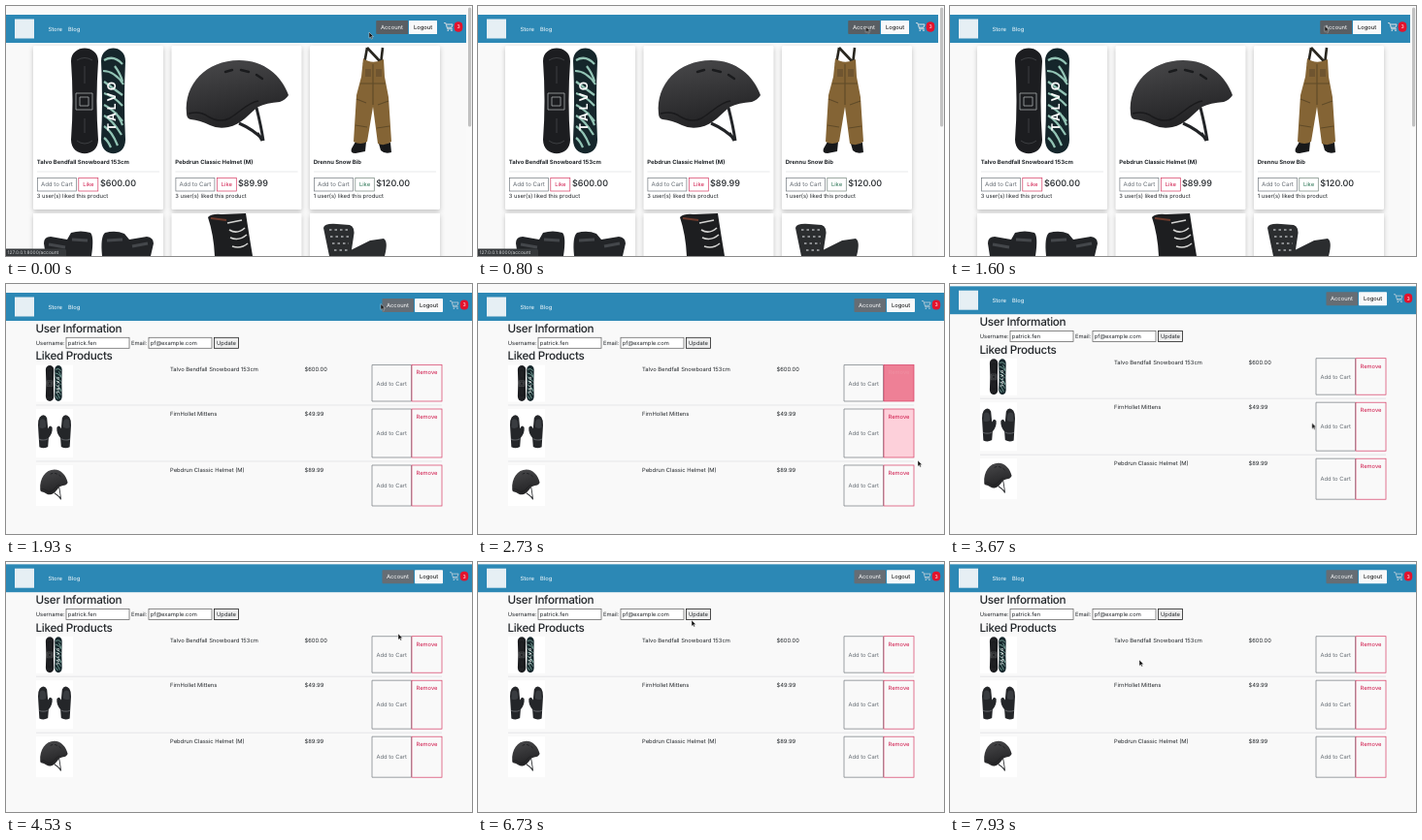
An HTML page that plays this animation: 480 by 258 pixels, repeating every 8000 ms.

```html
<!DOCTYPE html>
<html lang="en">
<head>
<meta charset="utf-8">
<title>Snow store</title>
<style>
  html, body { margin: 0; width: 100%; height: 100%; overflow: hidden; background: #f9f9f9; }
  svg { display: block; width: 100%; height: 100%; }
  text { font: 5.8px Inter, "Liberation Sans", sans-serif; fill: #212529; white-space: pre; text-rendering: geometricPrecision; }
  .mid { text-anchor: middle; }
  .bold { font-size: 5.9px; font-weight: 700; }
  .price { font-size: 9px; font-weight: 500; }
  .head { font-size: 11.7px; font-weight: 500; letter-spacing: -.025em; }
  .lite { fill: #fff; }
  .gray { fill: #666d74; }
  .red { fill: #cf1548; }
  .green { fill: #25704f; }
  .card { fill: #fff; filter: drop-shadow(0 2px 2.5px rgba(0, 0, 0, .22)); }
  .box { fill: none; stroke: #737a80; stroke-width: .7; }
  .box.r { stroke: #d63a63; }
  .box.g { stroke: #75857d; }
  .input { fill: #fff; stroke: #6b6b6b; stroke-width: .8; }
  .rule { stroke: #d9dbdd; stroke-width: .6; }

  .store, .account, .scroll, .status, .cursor, .h1, .h2, .t1 { animation: 8s linear infinite; }
  .store, .account, .scroll { animation-timing-function: step-end; }
  .store { animation-name: store; }
  .account { animation-name: account; }
  .scroll { animation-name: scroll; }
  .status { animation-name: status; }
  .cursor { animation-name: cursor; }
  .h1 { animation-name: hover1; }
  .h2 { animation-name: hover2; }
  .t1 { animation-name: label1; }

  @keyframes store { 0% { visibility: visible } 22.5%, 100% { visibility: hidden } }
  @keyframes account { 0% { visibility: hidden } 22.5%, 100% { visibility: visible } }
  @keyframes scroll {
    0% { transform: none }
    37.9% { transform: translateY(-2.8px) }
    39.1%, 100% { transform: translateY(-6.8px) }
  }
  @keyframes status { 0%, 16.5% { opacity: 1 } 19%, 100% { opacity: 0 } }
  @keyframes hover1 {
    0%, 30% { fill: #dc354500 } 31%, 32% { fill: #dc3559 }
    34.1%, 34.9% { fill: #ee8096 } 38%, 100% { fill: #ee809600 }
  }
  @keyframes label1 {
    0%, 30% { fill: #cf1548 } 31%, 32% { fill: #fff }
    34.1%, 34.9% { fill: #ee8ea1 } 38%, 100% { fill: #cf1548 }
  }
  @keyframes hover2 {
    0%, 31.6% { fill: #dc354500 } 32.5% { fill: #ec7890 }
    34.1%, 34.9% { fill: #fdd0da } 37%, 100% { fill: #fdd0da00 }
  }
  @keyframes cursor {
    0%, .8% { transform: translate(374px, 27px) }
    6.6%, 9.1% { transform: translate(402px, 21px) }
    14.1%, 15.9% { transform: translate(388px, 22px) }
    20%, 28.4% { transform: translate(386px, 20.5px) }
    31.25% { transform: translate(432px, 95px) }
    34.1% { transform: translate(453px, 182px) }
    38.4%, 41.6% { transform: translate(453px, 183px) }
    46.25% { transform: translate(366px, 140px) }
    51.6% { transform: translate(340px, 94px) }
    53.75% { transform: translate(368px, 77px) }
    56.6%, 75.9% { transform: translate(404px, 74px) }
    80% { transform: translate(300px, 84px) }
    84.1%, 86.6% { transform: translate(220px, 60px) }
    91.25% { transform: translate(210px, 81px) }
    96.6% { transform: translate(196px, 97px) }
    99.1%, 100% { transform: translate(195px, 101px) }
  }
</style>
</head>
<body>
<svg viewBox="0 0 480 258" preserveAspectRatio="none">
  <defs>
    <linearGradient id="shell" x2=".3" y2="1">
      <stop stop-color="#4a4a4c"/>
      <stop offset="1" stop-color="#232325"/>
    </linearGradient>

    <!-- products, each centred on 0,0 -->
    <g id="board">
      <path d="M-31-41C-31-59-3-59-3-41Q-6 0-3 40C-3 59-31 59-31 40Q-28 0-31-41Z" fill="#1c1d20"/>
      <path d="M-25-42q8-5 16 0M-25 41q8 6 16 0M-17-36v18M-17 18v15" fill="none" stroke="#3d3f42"/>
      <path d="M-26-8h17v17h-17zM-22-4h9v9h-9z" fill="none" stroke="#a8abad" stroke-width=".8"/>
      <path d="M0-41C0-59 25-59 25-41Q23 0 25 40C25 59 0 59 0 40Q2 0 0-41Z" fill="#15262b"/>
      <path d="M3-42q10-6 19 4M2-31q12 0 21 14M3-20q8 6 19 14M14-36q6 8 8 16M3-8q10 3 19 13M3 4q10 5 19 17M3 15q9 5 18 20M3 26q8 5 14 20M15 12q5 8 7 13M3 38q4 3 7 10" fill="none" stroke="#92c4b5" stroke-width="2.2"/>
      <text class="lite mid" transform="translate(15 4) rotate(-90)" style="font-size:12px;font-weight:700;letter-spacing:.24em">TALVO</text>
    </g>
    <g id="helmet">
      <path d="M20 6Q25 26 27 40M2 22Q16 28 27 39M26 40L21 32" fill="none" stroke="#222427" stroke-width="3"/>
      <path d="M-52 12C-55-18-32-43 2-43C28-43 46-27 53-7Q50-2 44 0Q30 1 22 5C12 12 4 24-9 26Q-20 28-28 24Q-38 19-48 18Q-52 17-52 12Z" fill="url(#shell)"/>
      <path d="M-50 12Q-38 9-30 15Q-18 22-8 17C4 10 10 1 22-1" fill="none" stroke="#1a1a1c" stroke-width="1.5"/>
      <path d="M-12-31l7-2M4-33l8 2M20-28l6 4" stroke="#1a1b1d" stroke-width="2.4" stroke-linecap="round"/>
    </g>
    <g id="bib">
      <path d="M-17 42L-21 49Q-23 54-17 54L-7 52L-6 42ZM7 44L9 51Q13 55 20 53L19 43Z" fill="#17181a"/>
      <path d="M-8-38L-5-55M9-38L11-55M-5-55L9-40" stroke="#29261f" stroke-width="2.6"/>
      <path d="M-9-44Q0-37 12-43L13-25L17-4L20 42Q13 47 6 44L1 6L-5 42Q-12 46-19 42L-16-6L-11-25Z" fill="#846435"/>
      <path d="M-12-18H14M1-38V4M-16-2l10 4M6 4l11-4M-17 25l12 2M5 28l13-2" fill="none" stroke="#604b28" stroke-width="1.2"/>
      <path d="M-7-33h6v8h-6zM4-33h6v8h-6z" fill="#6f5530"/>
    </g>
    <g id="mitt">
      <path d="M-28-38Q-14-50-6-36L-3-8Q3-20 10-11Q12 4-1 17L-3 40Q-16 47-29 41L-33-17Q-34-30-28-38Z" fill="#242629"/>
      <path d="M-27-30q10-8 17 3l1 15q-10 6-20 1z" fill="#393c40"/>
      <path d="M-30 20q14 5 27-1" fill="none" stroke="#5a5d61" stroke-width="3"/>
    </g>
    <g id="mittens">
      <use href="#mitt" x="-17"/>
      <use href="#mitt" transform="translate(17) scale(-1 1)"/>
    </g>

    <g id="offer">
      <rect class="card" y="41" x="28" width="134" height="169" rx="1.5"/>
      <path class="rule" d="M32 171H158"/>
      <rect class="box" x="32.4" y="177.4" width="40" height="13.6"/>
      <text class="gray mid" x="52.4" y="186.3" style="font-size:6.1px">Add to Cart</text>
    </g>

    <g id="tabs">
      <rect y="9" width="480" height="29" fill="#2c88b5"/>
      <rect x="9" y="13.5" width="20" height="20" fill="#e6eff4"/>
      <text class="lite" x="43.5" y="25.8">Store</text>
      <text class="lite" x="64" y="25.8">Blog</text>
    </g>
    <g id="tools">
      <rect x="387.5" y="15" width="32.5" height="14" rx=".8" fill="currentColor"/>
      <text class="lite mid" x="403.5" y="24">Account</text>
      <rect x="421" y="15" width="29" height="14" rx=".8" fill="#f8f9fa"/>
      <text class="mid" x="435.5" y="24" style="fill:#000">Logout</text>
      <path d="M457 17.5h1.8l2 6.2h5M459.5 19h6.500l-1 3.2h-4.500" fill="none" stroke="#c3d2dc" stroke-width=".8"/>
      <circle cx="461.3" cy="25.2" r=".7" fill="#c3d2dc"/>
      <circle cx="465" cy="25.2" r=".7" fill="#c3d2dc"/>
      <rect x="467.800" y="16.600" width="8.400" height="9.800" rx="4" fill="#e3132d"/>
      <text class="lite mid" x="472" y="23.4" style="font-size:5.2px">3</text>
    </g>
  </defs>

  <rect width="480" height="258" fill="#f9f9f9"/>

  <g class="store">
    <use href="#tabs"/>
    <use href="#tools" x="-6" color="#595e63"/>
    <use href="#offer"/>
    <use href="#offer" x="142.5"/>
    <use href="#offer" x="285"/>

    <use href="#board" x="98" y="98"/>
    <text class="bold" x="31.8" y="163">Talvo Bendfall Snowboard 153cm</text>
    <rect class="box r" x="74.8" y="177.4" width="20" height="13.6"/>
    <text class="red mid" x="84.8" y="186.3">Like</text>
    <text class="price" x="97" y="186">$600.00</text>
    <text x="31.8" y="198">3 user(s) liked this product</text>

    <use href="#helmet" x="238" y="99"/>
    <text class="bold" x="174.3" y="163">Pebdrun Classic Helmet (M)</text>
    <rect class="box r" x="217.3" y="177.4" width="20" height="13.6"/>
    <text class="red mid" x="227.3" y="186.3">Like</text>
    <text class="price" x="239" y="186">$89.99</text>
    <text x="174.3" y="198">3 user(s) liked this product</text>

    <use href="#bib" x="377" y="98"/>
    <text class="bold" x="316.8" y="163">Drennu Snow Bib</text>
    <rect class="box g" x="359.8" y="177.4" width="19.5" height="13.6"/>
    <text class="green mid" x="369.5" y="186.3">Like</text>
    <text class="price" x="381.3" y="186">$120.00</text>
    <text x="316.8" y="198">1 user(s) liked this product</text>

    <path class="card" d="M28 214h134v60H28zM170.5 214h134v60h-134zM313 214h134v60H313z"/>
    <path d="M39 245Q39 238 46 238L63 241L67 234Q77 231 87 234Q91 238 88 258H41ZM99 258Q97 238 102 234Q113 231 122 235L127 241L145 238Q152 239 152 245L149 258Z" fill="#222427"/>
    <path d="M44 246l17 3M68 241l16 1M104 242l16-1M130 248l16-3" stroke="#44474b" stroke-width="3"/>
    <path d="M208 218Q212 214 222 215L247 214Q250 234 254 258H215Q214 236 208 218Z" fill="#1d1e20"/>
    <path d="M211 219l16 2" stroke="#6e3a2c" stroke-width="2"/>
    <path d="M228 224l15-3M230 231q8 5 16-2M231 239q9 4 17-3M233 248q9 3 16-3" stroke="#d4d4d2" stroke-width="1.6" fill="none"/>
    <path d="M327 229Q328 224 341 225L354 226Q360 228 358 238L355 258H333ZM355 252L375 242L389 240Q394 243 390 258H354Z" fill="#2b2d2f"/>
    <path d="M333 231h20M334 238h19M336 245h17M338 252h15" stroke="#8b8d90" stroke-width="1.8" stroke-dasharray="2.5 3"/>

    <rect x="474" width="6" height="258" fill="#fafafa"/>
    <rect x="476" y="1.5" width="3.2" height="123" rx="1.6" fill="#c1c1c1"/>
    <use href="#tools" x="-6" color="#595e63"/>
    <g class="status">
      <path d="M0 250.500H60Q62 250.500 62 252.500V258H0Z" fill="#35383b"/>
      <text x="1.500" y="256.200" style="font-size:4.900px;fill:#d0d3d5">127.0.0.1:8000/account</text>
    </g>
  </g>

  <g class="account">
    <g class="scroll">
      <use href="#tabs"/>
      <use href="#tools" color="#666d74"/>
      <text class="head" x="30.5" y="50">User Information</text>
      <text x="30.8" y="63">Username:</text>
      <rect class="input" x="62" y="55.3" width="65" height="11"/>
      <text x="63.8" y="63">patrick.fen</text>
      <text x="129" y="63">Email:</text>
      <rect class="input" x="147" y="55.3" width="65" height="11"/>
      <text x="148.8" y="63">pf@example.com</text>
      <rect class="input" x="214.5" y="55.3" width="25" height="11" style="fill:#efefef;stroke:#222"/>
      <text class="mid" x="227" y="63">Update</text>
      <text class="head" x="30.5" y="78.4">Liked Products</text>
      <path class="rule" d="M31 125H449M31 183H449"/>

      <path d="M31 83.5h38v38H31zM31 129h38v50H31zM31 187h38v42H31z" fill="#fff"/>
      <use href="#board" transform="translate(50.2 102.5) scale(.3 .34)"/>
      <use href="#mittens" transform="translate(50 152.3) scale(.34 .39)"/>
      <use href="#helmet" transform="translate(49.3 207.5) scale(.27 .37)"/>

      <text x="169" y="90.3">Talvo Bendfall Snowboard 153cm</text>
      <text x="307.5" y="90.3">$600.00</text>
      <text x="169" y="135.5">FirnHollet Mittens</text>
      <text x="307.5" y="135.5">$49.99</text>
      <text x="169" y="193.5">Pebdrun Classic Helmet (M)</text>
      <text x="307.5" y="193.5">$89.99</text>

      <path class="box" d="M377 83.5h40.5v37.5H377zM377 129h40.5v50H377zM377 187h40.5v42H377z"/>
      <rect class="box r h1" x="418" y="83.5" width="31" height="37.5"/>
      <rect class="box r h2" x="418" y="129" width="31" height="50"/>
      <rect class="box r" x="418" y="187" width="31" height="42"/>
      <g class="mid">
        <text class="gray" x="397.2" y="104.5">Add to Cart</text>
        <text class="gray" x="397.2" y="156.2">Add to Cart</text>
        <text class="gray" x="397.2" y="210.3">Add to Cart</text>
        <text class="red t1" x="433.5" y="93.4">Remove</text>
        <text class="red" x="433.5" y="138.6">Remove</text>
        <text class="red" x="433.5" y="196.6">Remove</text>
      </g>
    </g>
  </g>

  <path class="cursor" d="M0 0V6.2L1.5 4.9L2.5 7.1L3.5 6.6L2.5 4.5H4.5Z" fill="#111" stroke="#fff" stroke-width=".4"/>
</svg>
</body>
</html>
```
